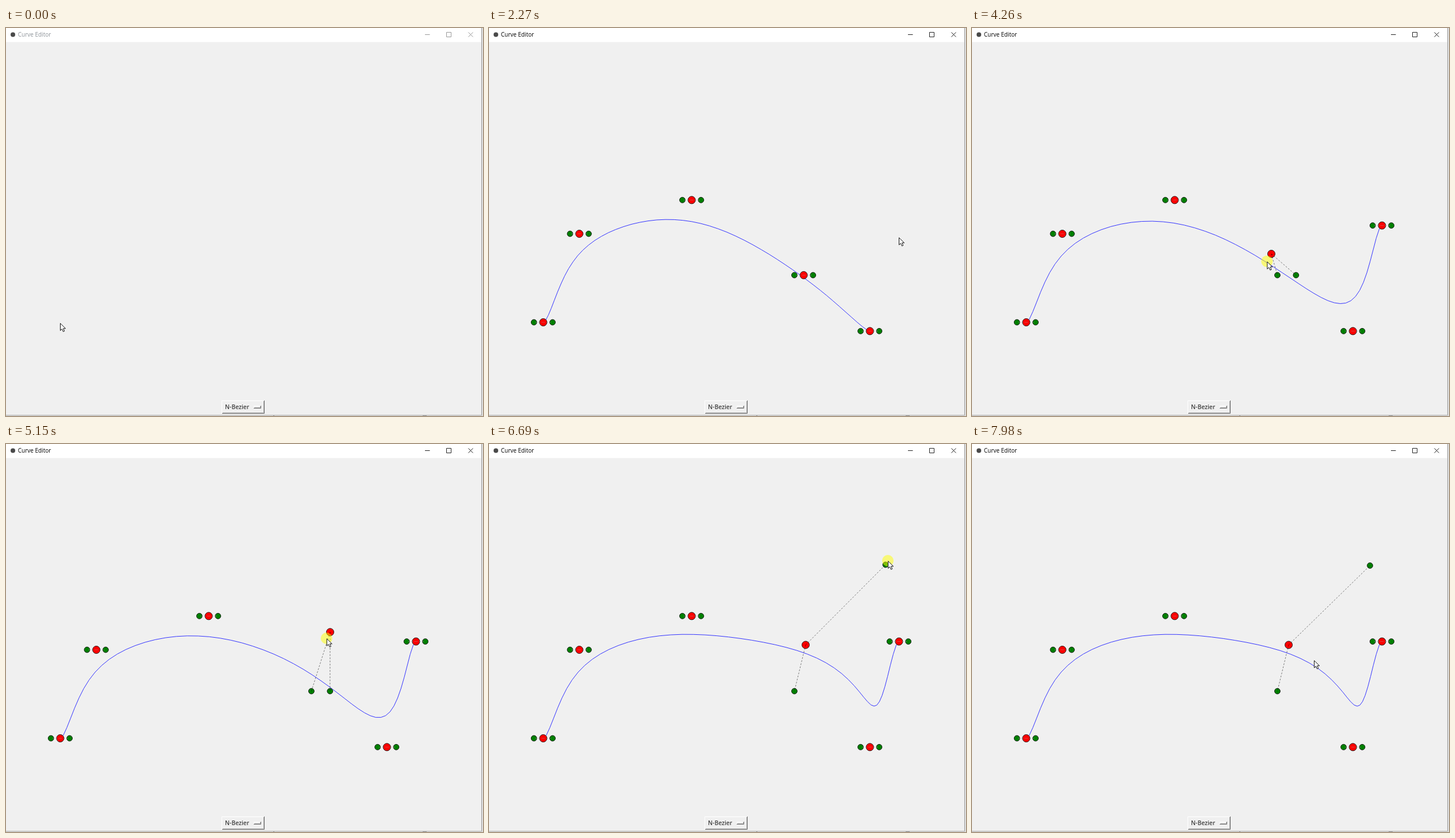
Animation of 830 by 675 pixels, one loop 8 s. Source, as an HTML page:

```html
<!DOCTYPE html>
<html lang="en">
<head>
<meta charset="utf-8">
<title>Curve Editor</title>
<style>
html, body { margin: 0; width: 100%; height: 100%; overflow: hidden; background: #f0f0f0; }
svg { display: block; width: 830px; height: 675px; }
text { font-family: "Open Sans", "Noto Sans", sans-serif; }
</style>
</head>
<body>
<svg viewBox="0 0 830 675">
  <rect width="830" height="675" fill="#f0f0f0"/>
  <rect width="827" height="24.5" fill="#fff"/>
  <circle cx="12" cy="11.5" r="4" fill="#4a4a4a"/>
  <text id="title" x="20.7" y="15" font-size="10">Curve Editor</text>
  <path id="controls" fill="none" d="M729 11.5h8.5M766.5 7.5h8v8h-8zM804.5 7.5l8 8M812.5 7.5l-8 8"/>
  <path d="M827.5 0V674" stroke="#a6a6a6"/>
  <path d="M828.5 0V675" stroke="#cfcfcf"/>
  <path d="M829.5 0V675" stroke="#ececec"/>
  <path d="M0 673.5H828" stroke="#b4b4b4"/>
  <path d="M0 674.5H830" stroke="#dadada"/>
  <path d="M465 674.5h2M725 674.5h7" stroke="#999"/>

  <g fill="none">
    <path d="M375.5 671V648.5H449M431.5 661V657.5H443" stroke="#fff"/>
    <path d="M376 670.5H449.5V648M431 661.5H443.5V657" stroke="#707070"/>
    <path d="M377 669.5H448.5V649M432 660.5H442.5V658" stroke="#a8a8a8"/>
  </g>
  <text x="381" y="663.3" font-size="10.3" font-weight="600" fill="#404040">N-Bezier</text>

  <polyline id="curve" fill="none" stroke="#3434ff"/>
  <g id="points"></g>
  <g id="pointer">
    <circle id="glow" r="10" fill="#ff0" fill-opacity=".5"/>
    <path d="M.5 .8V13.3l2.9-2.7 2.1 4.6 2.2-.9-2-4.5H9.6z" fill="#fff" stroke="#111"/>
  </g>
</svg>
<script>
const $ = id => document.getElementById(id);
const LOOP = 8000, TICK = 64.3, SEGMENTS = 50, REACH = 16.2;

const stop = (tick, x, y) => ({ tick, x, y });

// Clicks that add an anchor
const clicks = [
  stop(3, 94.4, 512), stop(11, 157.2, 358), stop(17, 352.7, 299.3),
  stop(23, 547.6, 430), stop(29, 662.8, 527.3), stop(37, 713.4, 343.6)
];

// Drags of the fourth anchor, then of its right handle
const anchorDrag = { from: 53, to: 82 };
const handleDrag = { from: 94, to: 120 };

// The pointer eases from stop to stop
const stops = [
  stop(0, 94, 513), ...clicks, stop(35, 713, 364), stop(46, 645, 460),
  stop(anchorDrag.from, 547.6, 430), stop(61, 547, 348), stop(67.5, 508, 415),
  stop(76, 577, 305), stop(anchorDrag.to, 551, 349.5),
  stop(94.5, 564, 430), stop(104, 694, 203), stop(110.5, 560.5, 577),
  stop(handleDrag.to, 692.5, 211.5), stop(124, 595, 376)
].sort((a, b) => a.tick - b.tick);

const ease = u => u * u * (3 - 2 * u);
const lerp = (a, b, u) => a + (b - a) * u;
const during = (k, { from, to }) => k >= from && k <= to;

function pointerAt(k) {
  const i = stops.findIndex(s => s.tick >= k);
  if (i === 0) return [stops[0].x, stops[0].y];
  const a = stops[i - 1], b = stops[i];
  const u = ease((k - a.tick) / (b.tick - a.tick));
  return [lerp(a.x, b.x, u), lerp(a.y, b.y, u)];
}

// Dragged parts trail the pointer by one tick
const dragged = (k, drag) => pointerAt(Math.min(k - 1, drag.to));

function knotsAt(k) {
  const knots = clicks.filter(c => k >= c.tick).map(({ x, y }) =>
    ({ p: [x, y], l: [x - REACH, y], r: [x + REACH, y], moved: false }));
  if (k > anchorDrag.from) {
    knots[3].p = dragged(k, anchorDrag);
    knots[3].moved = true;
  }
  if (k > handleDrag.from) knots[3].r = dragged(k, handleDrag);
  return knots;
}

function bezier(pts, t) {
  let row = pts;
  while (row.length > 1) {
    row = row.slice(1).map(([x, y], i) => [lerp(row[i][0], x, t), lerp(row[i][1], y, t)]);
  }
  return row[0];
}

function curvePoints(knots) {
  if (knots.length < 2) return "";
  const pts = knots.flatMap(n => [n.l, n.p, n.r]).slice(1, -1);
  return Array.from({ length: SEGMENTS + 1 }, (_, i) =>
    bezier(pts, i / SEGMENTS).map(n => n.toFixed(1))).join(" ");
}

const disc = ([x, y], r, fill) =>
  `<circle cx="${x}" cy="${y}" r="${r}" fill="${fill}" stroke="#111" stroke-width=".9"/>`;

function drawKnot({ p, l, r, moved }) {
  const arms = `<path d="M${p}L${l}M${p}L${r}" fill="none" stroke="${moved ? "#000" : "#999"}"
    stroke-opacity=".5" stroke-dasharray="3 2.5"/>`;
  return disc(p, 6.5, "#f00") + disc(l, 4.9, "#008000") + disc(r, 4.9, "#008000") + arms;
}

function draw(ms) {
  const k = Math.floor(ms / TICK);
  const knots = knotsAt(k);
  const pressed = clicks.some(c => Math.abs(k - c.tick) <= 1) ||
    during(k, anchorDrag) || during(k, handleDrag);
  const active = k >= 2;
  $("title").setAttribute("fill", active ? "#000" : "#8d9399");
  $("controls").setAttribute("stroke", active ? "#222" : "#999");
  $("curve").setAttribute("points", curvePoints(knots));
  $("points").innerHTML = knots.map(drawKnot).join("");
  $("pointer").setAttribute("transform", `translate(${pointerAt(k)})`);
  $("glow").setAttribute("visibility", pressed ? "visible" : "hidden");
}

const start = performance.now();
function frame() {
  draw((performance.now() - start) % LOOP);
  requestAnimationFrame(frame);
}
frame();
</script>
</body>
</html>
```
